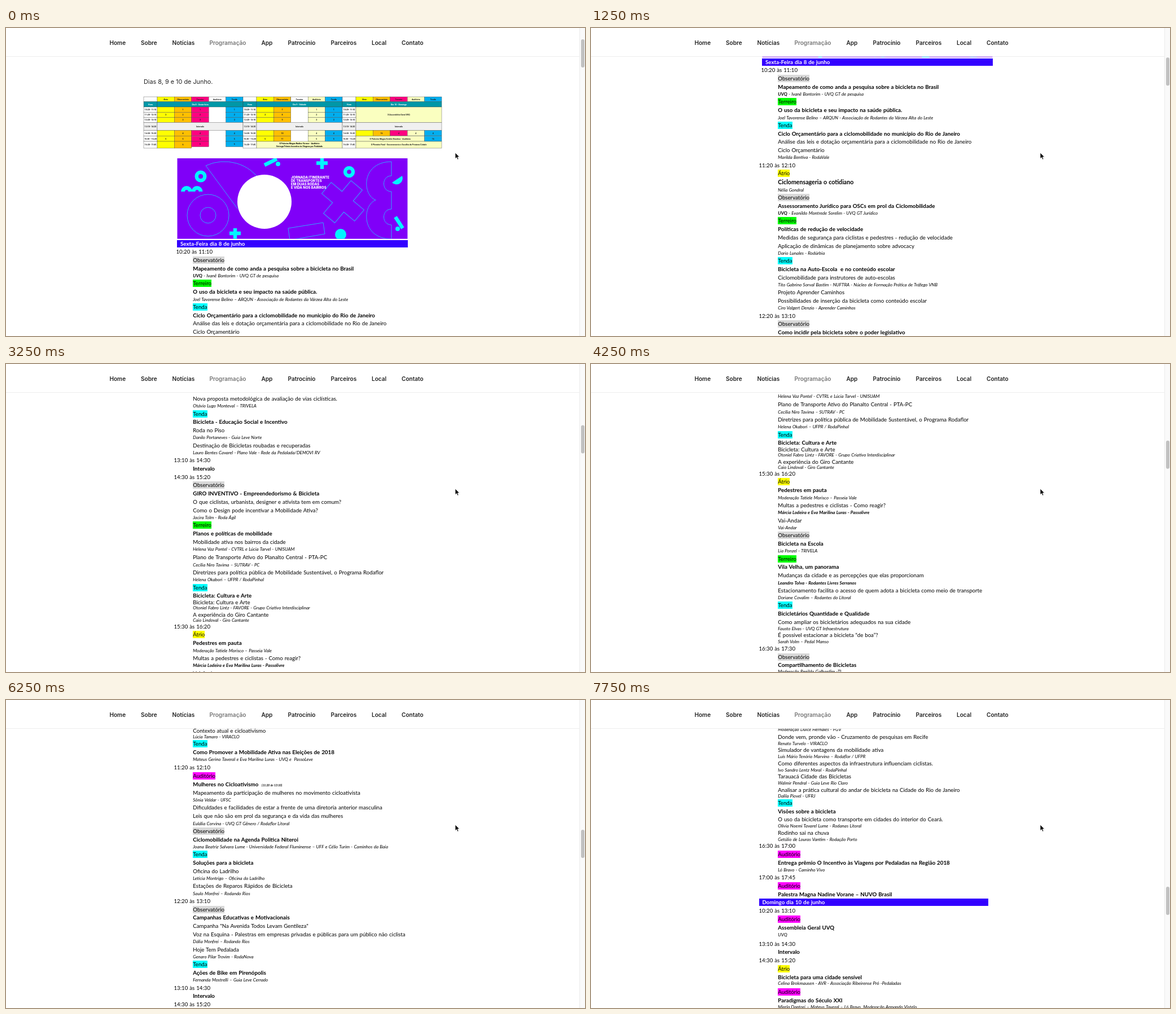
An HTML page for the animation above (8000 ms loop, 1026 by 546 pixels).

```html
<!DOCTYPE html>
<html lang="pt-BR">
<head>
<meta charset="utf-8">
<title>Programação</title>
<style>
html, body { margin: 0; width: 100%; height: 100%; overflow: hidden; background: #fff; }
#stage { position: relative; width: 1026px; height: 546px; overflow: hidden; font-family: Inter, sans-serif; }
#page { position: absolute; left: 0; top: 0; width: 1016px; }
#page > * { position: absolute; white-space: pre; }
#intro { left: 244px; top: 85px; font-size: 10.85px; line-height: 20px; color: #222; }
.row { left: 331.3px; font: 9.66px Lato, sans-serif; word-spacing: .05em; color: #000; }
.h { left: 297.5px; }
.H { left: 301.5px; }
.b, .c, .x, .X { font-weight: 700; font-size: 9.76px; }
.c { font-size: 10.65px; }
.i, .j, .s { font-size: 8px; font-style: italic; }
.s { font-size: 6.8px; }
.x, .X { left: 297.5px; width: 400px; padding-left: 6px; color: #fff; background: #3300ff; }
.X { left: 303px; width: 402.5px; }
.t span { display: inline-block; height: 13px; line-height: 13px; }
small { font-size: 5px; font-style: italic; }
nav { position: absolute; left: 0; top: 0; width: 1016px; height: 50px; background: #fff; border-bottom: 1px solid #eee; }
nav span { position: absolute; top: 16px; font-size: 10.05px; font-weight: 600; line-height: 20px; color: #222; }
#track { position: absolute; left: 1016px; top: 0; width: 9px; height: 546px; background: #fafafa; border-left: 1px solid #ebebeb; }
#thumb { position: absolute; left: 2px; top: 0; width: 6px; height: 50px; border-radius: 3px; background: #c1c1c1; }
#cursor { position: absolute; left: 794px; top: 219px; }
</style>
</head>
<body>
<div id="stage">
  <div id="page">
    <div id="intro">Dias 8, 9 e 10 de Junho.</div>
    <svg width="1016" height="376" style="left:0;top:0">
      <g id="table" font-family="Roboto, sans-serif" font-size="3.6" font-weight="700" text-anchor="middle"></g>
      <clipPath id="clip"><path d="M303.5 231H711.5V373.7H303.5z"/></clipPath>
      <g clip-path="url(#clip)">
        <path fill="#8000f8" d="M303 230H712V375H303z"/>
        <g fill="none" stroke="#35a5ff">
          <circle cx="358" cy="332" r="37"/><circle cx="358" cy="332" r="14"/>
          <path d="M354 244L410 320M354 244A78 78 0 0 1 452 272"/>
          <path transform="translate(597 308) rotate(40)" d="M-13-38H13V-13H38V13H13V38H-13V13H-38V-13H-13z"/>
          <path d="M683 237C630 237 630 295 655 305C630 315 630 374 683 374V349c-18 0-18-28 0-28V290c-18 0-18-28 0-28z"/>
          <path d="M500 355L562 345L565 365L503 376z"/>
        </g>
        <g fill="none" stroke="#00f5ff" stroke-width="6.5">
          <circle cx="345" cy="263" r="7.3"/><circle cx="608" cy="255" r="7"/>
          <path d="M313.5 290a6.5 6.5 0 0 1 13 0M332 290a6.5 6.5 0 0 1 13 0" stroke-width="7"/>
          <path d="M560 230V250M550 239.5H570M406 355V375M396 364H416M458 243L480 232M690 335L703 355"/>
        </g>
        <g fill="#00f5ff">
          <circle cx="482" cy="241" r="4"/><circle cx="694" cy="356" r="4"/><circle cx="593" cy="366" r="10"/>
          <path d="M684 274L702 262A11 11 0 0 1 684 274z"/>
        </g>
        <circle cx="458" cy="308" r="48" fill="#fff"/>
        <g fill="#fff" font-family="Inter, sans-serif" font-size="6" font-weight="800">
          <text x="505" y="267">JORNADA ITINERANTE</text><text x="505" y="273">DE TRANSPORTES</text>
          <text x="505" y="279">EM DUAS RODAS</text><text x="505" y="285">E VIDA NOS BAIRROS</text>
        </g>
      </g>
    </svg>
  </div>
  <nav></nav>
  <div id="track"><div id="thumb"></div></div>
  <svg id="cursor" width="14" height="18"><path transform="translate(2 2)" d="M0 0V10.6L2.5 8.4L4.2 12.2L6 11.4L4.4 7.8H7.6z" stroke="#fff" stroke-width=".8"/></svg>
</div>
<script>
const $ = id => document.getElementById(id);

// Navigation
const menu = { Home: 183.5, Sobre: 239, Notícias: 294.5, Programação: 360.5, App: 452.5,
  Patrocínio: 499.5, Parceiros: 575.5, Local: 648, Contato: 701 };
document.querySelector('nav').innerHTML = Object.entries(menu).map(([name, x]) =>
  `<span style="left:${x}px${name === 'Programação' ? ';color:#767676' : ''}">${name}</span>`).join('');

// Timetable
const Y = '#ffff00', O = '#ffc000', P = '#ff0080', W = '#fff', B = '#00aeef', L = '#faffc0', TEAL = '#0097a7';
const rooms = ['Átrio', 'Observatório', 'Terreiro', 'Auditório', 'Tenda'];
const slots = ['10:20- 11:10', '11:20- 12:10', '12:20- 13:10', '13:10- 14:20', '14:30- 15:20', '15:30 - 16:20', '16:30- 17:45'];
const edges = [140, 149.5, 158.5, 167.5, 181.5, 191.5, 201, 213];
let cells = '';
function cell(x, y, w, h, fill, text = '', color = '#222') {
  cells += `<rect x="${x}" y="${y}" width="${w}" height="${h}" fill="${fill}" stroke="#444" stroke-width=".4"/>` +
    `<text x="${x + w / 2}" y="${y + h / 2 + 1.3}" fill="${color}">${text}</text>`;
}
[[244, [Y, O, P, W, B], 'Dia 8 - Sexta-feira'], [420, [Y, O, W, L, B], 'Dia 9 - Sábado'], [596, [Y, O, P, L, B], 'Dia 10 - Domingo']]
.forEach(([x, fills, label], day) => {
  const body = x + 24;
  cell(x, 122, 24, 8.5, W);
  fills.forEach((fill, c) => cell(body + c * 30.4, 122, 30.4, 8.5, fill, rooms[c]));
  cell(x, 130.5, 24, 9.5, TEAL, 'Hora', '#fff');
  cell(body, 130.5, 152, 9.5, TEAL, label, '#fff');
  slots.forEach((slot, r) => {
    const y = edges[r], h = edges[r + 1] - y;
    cell(x, y, 24, h, r === 3 ? '#f0f0f0' : W, slot);
    if (r === 3) return cell(body, y, 152, h, '#f0f0f0', 'Intervalo');
    if (day === 2 && r < 3) return r || cell(body, y, 152, 27.5, L, 'X Assembléia Geral UVQ');
    if (day === 2 && r === 5) {
      cell(body, y, 121.6, h, L, 'X Palestra Magna Evaldo Brantina - Auditório');
      return cell(body + 121.6, y, 30.4, h, B, 16);
    }
    if (day === 2 && r === 6) return cell(body, y, 152, h, L, 'X Plenária Final - Encerramento e Escolha da Próxima Cidade');
    if (day === 1 && r === 6) {
      cell(body, y, 152, h, L);
      cells += `<text x="${body + 76}" y="205.5">X Palestra Magna Nadine Vorane - Auditório</text>` +
        `<text x="${body + 76}" y="210.5">Entrega Prêmio Incentivo às Viagens por Pedalada</text>`;
      return;
    }
    const n = r < 3 ? r + 1 : r;
    fills.forEach((fill, c) => fill !== W && cell(body + c * 30.4, y, 30.4, Math.min(h, c > 1 ? 9.5 : h), fill,
      c === 0 && r % 4 !== 1 ? '' : c === 1 ? n + day * 6 : n));
  });
});
$('table').innerHTML = cells;

// Programme: each line is a kind, an optional nudge in px, and the text.
const heights = { i: 12, j: 8.7, s: 8.7, c: 16 };
const tagFill = { Observatório: '#d9d9d9', Terreiro: '#00ff00', Tenda: '#00ffff', Átrio: '#ffff00', Auditório: '#ff00ff' };
function section(y, lines) {
  let last = 0;
  for (const line of lines.trim().split('\n')) {
    const [, kind, nudge, text] = line.match(/^(\w)([-+.\d]*) (.*)$/);
    const h = heights[kind] || 14.7, boxH = 'xXt'.includes(kind) ? 13 : 14.7;
    if (last) y += (last + h) / 2 + (+nudge || 0);
    last = h;
    const row = document.createElement('div');
    row.className = 'row ' + kind;
    row.style.cssText = `top:${y - boxH / 2}px;line-height:${boxH}px`;
    row.innerHTML = kind === 't' ? `<span style="background:${tagFill[text]}">${text}</span>` : text;
    $('page').append(row);
  }
}

section(382, `
X Sexta-Feira dia 8 de junho
H 10:20 às 11:10
t Observatório
b Mapeamento de como anda a pesquisa sobre a bicicleta no Brasil
i <b>UVQ</b> - Ivanê Bontorim - UVQ GT de pesquisa
t Terreiro
b O uso da bicicleta e seu impacto na saúde pública.
i Joel Tavorense Belino – ARQUN - Associação de Rodantes da Várzea Alta do Leste
t Tenda
b Ciclo Orçamentário para a ciclomobilidade no município do Rio de Janeiro
r Análise das leis e dotação orçamentária para a ciclomobilidade no Rio de Janeiro
r Ciclo Orçamentário
i Marilda Bentiva - RodaVale
h 11:20 às 12:10
t Átrio
c Ciclomensageria o cotidiano
i Nélia Gondral
t Observatório
b Assessoramento Jurídico para OSCs em prol da Ciclomobilidade
i <b>UVQ</b> - Evanildo Montrede Sorelim - UVQ GT Jurídico
t Terreiro
b Políticas de redução de velocidade
r Medidas de segurança para ciclistas e pedestres - redução de velocidade
r Aplicação de dinâmicas de planejamento sobre advocacy
i Dario Lunales - Rodúrbia
t Tenda
b Bicicleta na Auto-Escola  e no conteúdo escolar
r Ciclomobilidade para instrutores de auto-escolas
i Tito Gabrino Sorval Bastim - NUFTRA - Núcleo de Formação Prática de Tráfego VNB
r Projeto Aprender Caminhos
r Possibilidades de inserção da bicicleta como conteúdo escolar
i Ciro Valgert Denzio - Aprender Caminhos
h 12:20 às 13:10
t Observatório
b Como incidir pela bicicleta sobre o poder legislativo
i <b>UVQ</b> - Gérson Otoniel Tamborelo Neto – UVQ GT Políticas Públicas
t Terreiro
b Avaliações Cicloviárias
r O Índice de Desenvolvimento Cicloviário RUPEVIA Região Metropolitana do Recife
i Renato Turvelo - VIRACLO
r Nova proposta metodológica de avaliação de vias ciclísticas.
i Otávio Lugo Monteval – TRIVELA
t Tenda
b Bicicleta - Educação Social e Incentivo
r Roda no Piso
i Danilo Portaneves - Guia Leve Norte
r Destinação de Bicicletas roubadas e recuperadas
i Lauro Bentes Cavarel - Plano Vale - Rede da Pedalada/DEMOVI RV
h 13:10 às 14:30
b Intervalo
h 14:30 às 15:20
t Observatório
b GIRO INVENTIVO - Empreendedorismo &amp; Bicicleta
r O que ciclistas, urbanista, designer e ativista tem em comum?
r Como o Design pode incentivar a Mobilidade Ativa?
i Jacira Tolm - Roda Ágil
t Terreiro
b Planos e políticas de mobilidade
r Mobilidade ativa nos bairros da cidade
i Helena Vaz Pontel - CVTRL e Lúcia Tarvel - UNISUAM`);

section(1225.7, `
r Plano de Transporte Ativo do Planalto Central - PTA-PC
i Cecília Niro Tavima – SUTRAV - PC
r Diretrizes para política pública de Mobilidade Sustentável, o Programa Rodaflor
i Helena Okabori – UFPR / RodaPinhal
t Tenda
b Bicicleta: Cultura e Arte
r-2.7 Bicicleta: Cultura e Arte
j-1.7 Otoniel Fabro Lintz - FAVORE - Grupo Criativo Interdisciplinar
r A experiência do Giro Cantante
j-2.2 Caio Lindoval - Giro Cantante
h 15:30 às 16:20
t-.5 Átrio
b Pedestres em pauta
i Moderação Tatiele Morisco – Passeia Vale
r Multas a pedestres e ciclistas - Como reagir?
i <b>Márcia Lodeira e Eva Marilina Luras - Passolivre</b>
r Vai-Andar
i Vai-Andar
t Observatório
b Bicicleta na Escola
i Lia Ponzel - TRIVELA
t Terreiro
b Vila Velha, um panorama
r Mudanças da cidade e as percepções que elas proporcionam
i <b>Leandro Tolva - Rodantes Livres Serranos</b>
r Estacionamento facilita o acesso de quem adota a bicicleta como meio de transporte
i Doriane Covalim – Rodantes do Litoral
t Tenda
b Bicicletários Quantidade e Qualidade
r Como ampliar os bicicletários adequados na sua cidade
j Fausto Elvas - UVQ GT Infraestrutura
r É possível estacionar a bicicleta “de boa”?
j Sarah Volm – Pedal Manso`);

section(1658.3, `
h 16:30 às 17:30
t Observatório
b Compartilhamento de Bicicletas
j Moderação Renildo Galhardim -TL
r Rodamiga
j Noêmia Rosalva Terso – UFPR
s+.5 Karina Lopar dos Prados - Telma Hastner Lagovani - Luciana de Morim - Armando Leonildo Zorin Mastrolevski
r Pedalante Corporativo
j Íris Dos Campos - Murvell
t Terreiro
b-2 Conceito dos Jogos de Bicicleta
i-3.3 <b>Rita Solvani - Guia Leve Litoral</b>
t Tenda
b O olhar através da bicicleta
r+1 Pedal da AVELSU
j Raul Tolvedo – AVELSU Associação dos Videntes da Estância do Litoral do Sul
r VRTK
j  <b>Nara Celine De Altiva Monfort e Bianca de Valadares Lume - Guias Leves Serra Grande e Porto</b>`);

section(1882, `
x Sábado dia 9 de junho
h 10:20 às 11:10
t-.7 Átrio
b Mulheres e Mobilidade
j+1.1 Moderação Irene Montesul - Rodúrbia
r Vamos, amiga!
j <b>Solange Tamurai e Iara Dolvim - Guia Leve Norte</b>
r Festival “50Minas50Rodas”
j <b>Zuleica Prates e Cora Vandim - 50minas50rodas</b>
r Mulheres Caminhantes, auditoria de segurança de gênero e caminhabilidade
j <b>Eva Marilina Luras e Leonora Dutrel - PassoLeve</b>
t+1 Auditório
b Contagens de ciclistas: monitoramento do uso de bicicletas em escala municipal
i Tadeu Marsalli – NUVO Brasil
t Observatório
b Cicloativismo e ações politicas
i Moderação Fausto Elvas - UVQ
r-1.6 Prefeitura de Corimbava extinguiu infraestruturas "Trilhas Claras"
j <b>Ivo Sandro Lentz Moral - RodaPinhal</b>
r Memória e historia do cicloativismo no Brasil
j Armando Vistelo – UVQ GT Pesquisa
r Contexto atual e cicloativismo
j Lúcia Tamaro - VIRACLO
t Tenda
b Como Promover a Mobilidade Ativa nas Eleições de 2018
i Mateus Gerino Taveral e Eva Marilina Luras - UVQ e  PassoLeve
h 11:20 as 12:10
t+.8 Auditório
b+.3 Mulheres no Cicloativismo  <small>(11:20 às 13:10)</small>
r Mapeamento da participação de mulheres no movimento cicloativista
i Sônia Veldar - UFSC
r Dificuldades e facilidades de estar a frente de uma diretoria anterior masculina
r Leis que não são em prol da segurança e da vida das mulheres
i Eulália Corvina - UVQ GT Gênero / Rodaflor Litoral
t Observatório
b Ciclomobilidade na Agenda Politica Niteroi
i Joana Beatriz Salvara Lume - Universidade Federal Fluminense – UFF e Célio Turim - Caminhos da Baía
t Tenda
b Soluções para a bicicleta
r Oficina do Ladrilho
i Letícia Montrigo – Oficina do Ladrilho
r Estações de Reparos Rápidos de Bicicleta
i Saulo Monfrei – Rodando Rios
h 12:20 às 13:10
t Observatório
b Campanhas Educativas e Motivacionais
r Campanha "Na Avenida Todos Levam Gentileza"
r Voz na Esquina - Palestras em empresas privadas e públicas para um público não ciclista
i Dália Monfrei – Rodando Rios
r Hoje Tem Pedalada
i Genaro Pilar Trovim - RodaNova
t Tenda
b Ações de Bike em Pirenópolis
i Fernanda Mostrelli – Guia Leve Cerrado
h 13:10 às 14:30
b Intervalo
h 14:30 às 15:20
t Átrio
b Caminhos para a cidade
i Moderação Lina Tovar - Rodúrbia
r Ruas abertas e convivência nos bairros
i Célia Brunal - PassoLeve
r Calçadas seguras para todas as idades
i Vera Montês - Passolivre
t Auditório
b Participação social e mobilidade
i Breno Casteval - UVQ
r Conselhos municipais e orçamento
i Lauro Nestal - VIRACLO
t Observatório
b Pesquisas sobre o uso da bicicleta
i Moderação Ivo Brantel - UVQ
r Perfil de quem pedala nas cidades
i Tânia Solvar - UFPR
r Contagem de viagens em áreas centrais
i Nilo Gaspel - TRIVELA
t Tenda
b Bicicleta e trabalho
i Rute Valdim - Rodamiga
r Entregas por bicicleta
i Joel Santel - Roda Ágil
h 15:30 às 16:20
t Átrio
b Infância e bicicleta
i Moderação Alda Viral - RodaNova
r Aprender a pedalar na escola
i Mara Lintel - Aprender Caminhos
t Terreiro
b Manutenção e autonomia
i Elói Cardal - Pedal Manso
r Oficinas comunitárias
i Dina Velasto - Rodaflor
t Observatório
b Pesquisas em mobilidade`);

section(3156, `
i Moderação Dulce Hernales - FGV
r Donde vem, pronde vão - Cruzamento de pesquisas em Recife
j Renato Turvelo - VIRACLO
r Simulador de vantagens da mobilidade ativa
j Luís Mário Tenório Marvino – Rodaflor / UFPR
r Como diferentes aspectos da infraestrutura influenciam ciclistas.
j Ivo Sandro Lentz Moral - RodaPinhal
r Tarauacá Cidade das Bicicletas
j Walmir Pendral - Guia Leve Rio Claro
r Analisar a prática cultural do andar de bicicleta na Cidade do Rio de Janeiro
j Dalila Piovel - UFRJ
t Tenda
b Visões sobre a bicicleta
r O uso da bicicleta como transporte em cidades do interior do Ceará.
j Olívia Noemi Tavarel Lume - Rodanas Litoral
r Rodinho sai na chuva
j Getúlio de Louras Vantim - Rodação Porto
h 16:30 às 17:00
t Auditório
b Entrega prêmio O Incentivo às Viagens por Pedaladas na Região 2018
i Ló Bravo - Caminho Vivo
h 17:00 às 17:45
t Auditório
b Palestra Magna Nadine Vorane – NUVO Brasil
x Domingo dia 10 de junho
h 10:20 às 13:10
t Auditório
b Assembleia Geral UVQ
i UVQ
h+2.5 13:10 às 14:30
b Intervalo
h 14:30 às 15:20
t Átrio
b Bicicleta para uma cidade sensível
i-1.5 Celina Brokmausen - AVR - Associação Ribeirense Pró -Pedaladas
t+1.5 Auditório
b Paradigmas do Século XXI
j Mirela Dantori – Mateus Taveral – Ló Bravo  Moderação Armando Vistelo`);

// Scroll position as [step, px]; the view advances once every 250 ms.
const stops = [[0, 0], [5, 321.8], [9, 612], [17, 1154], [21, 1609.5], [25, 2095], [31, 3104]];
function scrollAt(step) {
  const i = stops.findIndex(s => s[0] >= step);
  if (i < 1) return 0;
  const [a, from] = stops[i - 1], [b, to] = stops[i];
  return from + (to - from) * (step - a) / (b - a);
}
function draw() {
  const y = scrollAt(Math.floor(performance.now() % 8000 / 250));
  $('page').style.transform = `translateY(${-Math.round(y)}px)`;
  $('thumb').style.transform = `translateY(${20 + y / 9.98}px)`;
  requestAnimationFrame(draw);
}
draw();
</script>
</body>
</html>
```
